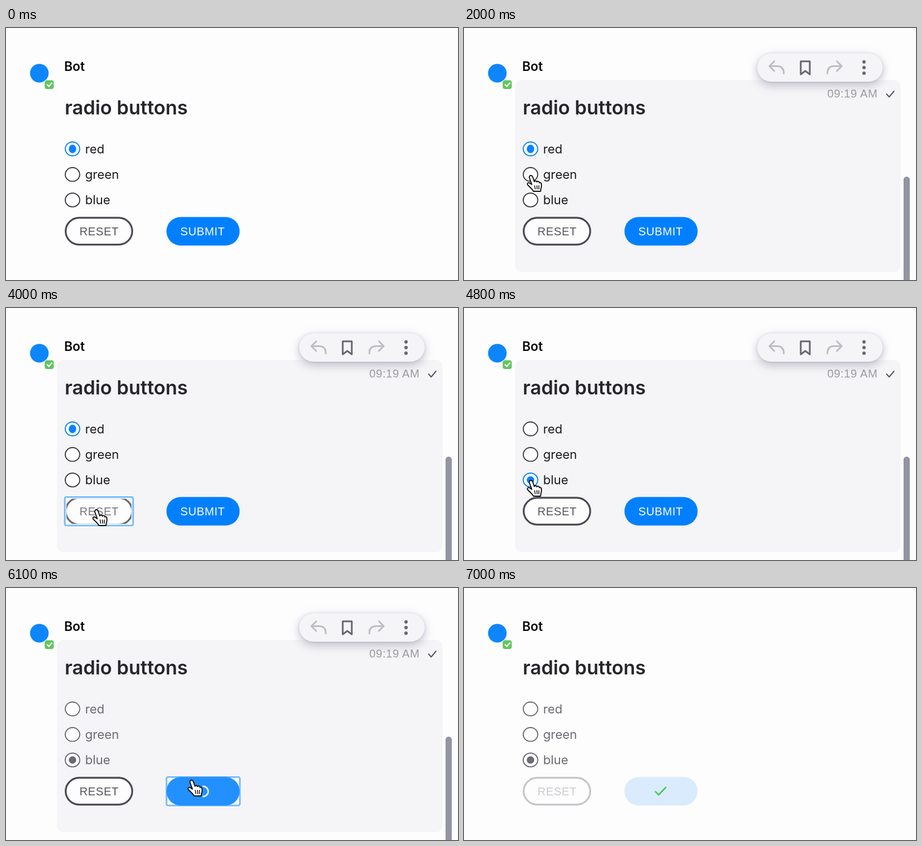
Animation of 800x446 px, one loop 7.9 s. Source, as an HTML page:

```html
<!DOCTYPE html>
<html lang="en">
<head>
<meta charset="utf-8">
<style>
  html, body { margin: 0; width: 100%; height: 100%; overflow: hidden; background: #fefdfe; }
  svg { display: block; width: 100%; height: 100%; }
  text { font: 22px Inter, sans-serif; fill: #1b1c1f; }
  .name { font-size: 22.5px; font-weight: 600; fill: #060607; }
  .title { font-size: 34px; font-weight: 600; fill: #24262a; }
  .caps { font: 20px "Liberation Sans", Arial, sans-serif; letter-spacing: .6px; }
  .line { fill: none; stroke-linecap: round; stroke-linejoin: round; }
  #toolbar > rect { fill: #f5f4f7; filter: drop-shadow(0 5px 9px #56567a50) drop-shadow(0 1px 2px #56567a30); }
  #toolbar .line { stroke-width: 3; }
</style>
</head>
<body>
<svg viewBox="0 0 800 446">
  <g id="hoverLayer">
    <rect x="90" y="92" width="683" height="340" rx="12" fill="#f5f4f6"/>
    <rect id="scrollbar" x="778" y="263" width="11" height="200" rx="5.5" fill="#9395a2"/>
    <text class="caps" x="643" y="123" style="fill:#9c9da2">09:19 AM</text>
    <path class="line" d="M748 117l4.5 5 8.500-10" stroke="#55575d" stroke-width="2"/>
    <g id="toolbar">
      <rect x="519" y="45" width="222" height="50" rx="25"/>
      <path id="reply" class="line" d="M549 59l-8.500 8.500 8.500 8.500M541 67.500h13q12 0 12 13" stroke="#bebec2"/>
      <path class="line" d="M596 59h16v23l-8-6-8 6z" stroke="#67686d"/>
      <use href="#reply" transform="translate(1209) scale(-1 1)"/>
      <g fill="#67686d"><circle cx="708" cy="60" r="3"/><circle cx="708" cy="70" r="3"/><circle cx="708" cy="80" r="3"/></g>
    </g>
  </g>

  <circle cx="59" cy="80" r="16.500" fill="#0d86fc"/>
  <rect x="68" y="92" width="17" height="16.500" rx="4" fill="#62c55f" stroke="#fefdfe" stroke-width="1"/>
  <path class="line" d="M73 100.500l2.800 2.800 5.200-5.800" stroke="#fff" stroke-width="2.400"/>
  <text class="name" x="103" y="76">Bot</text>
  <text class="title" x="104" y="153">radio buttons</text>
  <g id="radios"></g>

  <rect id="reset" x="105.600" y="335.800" width="117.800" height="47.600" rx="23.800" fill="#fefdfe" stroke-width="3.200"/>
  <text id="resetText" class="caps" x="130" y="367">RESET</text>
  <g id="ring" class="line">
    <rect x="104" y="334.500" width="121" height="50.500" rx="3" stroke="#fff" stroke-width="6"/>
    <rect x="104" y="334.500" width="121" height="50.500" rx="3" stroke="#79bcfb" stroke-width="3.200"/>
  </g>
  <g id="submitRing">
    <rect x="281" y="332" width="136" height="56" rx="5" fill="#fff"/>
    <rect x="284" y="334.500" width="130" height="50.500" rx="3" fill="#fff" stroke="#79bcfb" stroke-width="3.200"/>
  </g>
  <rect id="submit" x="284" y="334.500" width="129.500" height="50.500" rx="25"/>
  <text id="submitText" class="caps" x="308.500" y="367" style="fill:#fff">SUBMIT</text>
  <path id="spinner" class="line" d="M349 351a9 9 0 0 1 0 18" stroke="#e4f1ff" stroke-width="2.800"/>
  <path id="done" class="line" d="M339 360.500l5.500 5.500 12.500-13" stroke="#50c95c" stroke-width="2.800"/>

  <g id="cursor">
    <path id="arrow" d="M0 0V25L5.500 20 10 31 14 29 9.500 18.500H16Z" fill="#000" stroke="#fff" stroke-width="1.500"/>
    <g id="hand" class="line" stroke="#111" stroke-width="1.900">
      <path fill="#fff" d="M-2 4C-4-1 2-3 3.500 1.500L6.500 10C7 8 10 8 11 10.500 12 8.500 15 9 15.500 12 17 10.500 19 12 19 15 20 19 17.500 22 17.500 27H5C3 23-1 20-5 16-7.500 13-4 10.500-1 13L2 15Z"/>
      <path d="M7 17l1 6M11 17l.500 6M14.500 17v6" stroke-width="1.500"/>
    </g>
  </g>
</svg>
<script>
const LOOP = 7900, TICK = 100;
const $ = id => document.getElementById(id);
const set = (id, attrs) => { for (const k in attrs) $(id).setAttribute(k, attrs[k]); };
const show = (id, on) => set(id, { visibility: on ? 'visible' : 'hidden' });

const rows = ['red', 'green', 'blue'].map((label, i) => ({ label, y: 214 + i * 45.2 }));
$('radios').innerHTML = rows.map(({ label, y }) => `
  <ellipse id="${label}Ring" cx="117.700" cy="${y}" rx="12.800" ry="12.200" fill="#fff" stroke-width="1.900"/>
  <ellipse id="${label}Dot" cx="117.700" cy="${y}" rx="6.600" ry="${label === 'red' ? 7.4 : 6.6}"/>
  <text id="${label}Text" x="140" y="${y + 7.5}">${label}</text>`).join('');

// Pointer stops: time, x, y
const stops = [
  [100, 341, 356], [700, 142, 290], [900, 142, 290], [1200, 122, 272], [1600, 118, 262],
  [2400, 118, 262], [3100, 162, 361], [3900, 162, 361], [4600, 118, 306], [4800, 118, 306],
  [5400, 328, 341], [6400, 328, 341], [6900, 350, 450]
];

function pointerAt(t) {
  const i = Math.max(1, stops.findIndex(s => s[0] > t));
  const [t0, x0, y0] = stops[i - 1], [t1, x1, y1] = stops[i];
  const p = Math.max(0, (t - t0) / (t1 - t0)), e = p * p * (3 - 2 * p);
  return [x0 + (x1 - x0) * e, y0 + (y1 - y0) * e];
}

function draw(t) {
  const active = t >= 1700 && t < 7000;
  const pointing = t >= 100 && t < 6900;
  const [x, y] = pointing ? pointerAt(t) : [-50, -50];
  const over = (x0, x1, y0, y1) => active && x >= x0 && x <= x1 && y >= y0 && y <= y1;
  const overReset = over(104, 225, 334, 385);
  const overSubmit = over(284, 414, 334, 385);
  const overRadio = rows.some(r => over(104, 200, r.y - 13, r.y + 13));
  const sent = t >= 5700, done = t >= 6400;
  const chosen = t < 2400 || (t >= 3500 && t < 4700) ? 'red' : t < 3500 ? 'green' : 'blue';

  show('hoverLayer', active);
  set('scrollbar', { opacity: Math.min(1, (t - 1600) / 300) });
  for (const { label } of rows) {
    const on = label === chosen;
    const color = sent ? '#6b6c73' : on ? '#0a82fb' : '#3c3d42';
    set(label + 'Ring', { stroke: color });
    set(label + 'Dot', { fill: color });
    show(label + 'Dot', on);
    $(label + 'Text').style.fill = sent ? '#6b6c73' : '';
  }

  const resetColor = done ? '#c5c5ca' : overReset ? '#686970' : '#494a52';
  set('reset', { stroke: resetColor });
  $('resetText').style.fill = done ? '#cbcbd0' : overReset ? '#77787e' : '#55565e';
  show('ring', t >= 3500 && t < 4700);
  show('submitRing', t >= 5600 && !done);
  set('submit', { fill: done ? '#daebfd' : overSubmit ? '#2390ff' : '#0080ff' });
  show('submitText', !sent);
  show('spinner', sent && !done);
  set('spinner', { transform: `rotate(${(t - 6100) * 0.36} 349 360)` });
  show('done', done);

  const hand = overReset || overSubmit || overRadio;
  set('cursor', { transform: `translate(${x} ${y})` });
  show('arrow', pointing && !hand);
  show('hand', pointing && hand);
}

const start = performance.now();
function frame() {
  const t = (performance.now() - start) % LOOP;
  draw(Math.floor(t / TICK) * TICK);
  requestAnimationFrame(frame);
}
frame();
</script>
</body>
</html>
```
